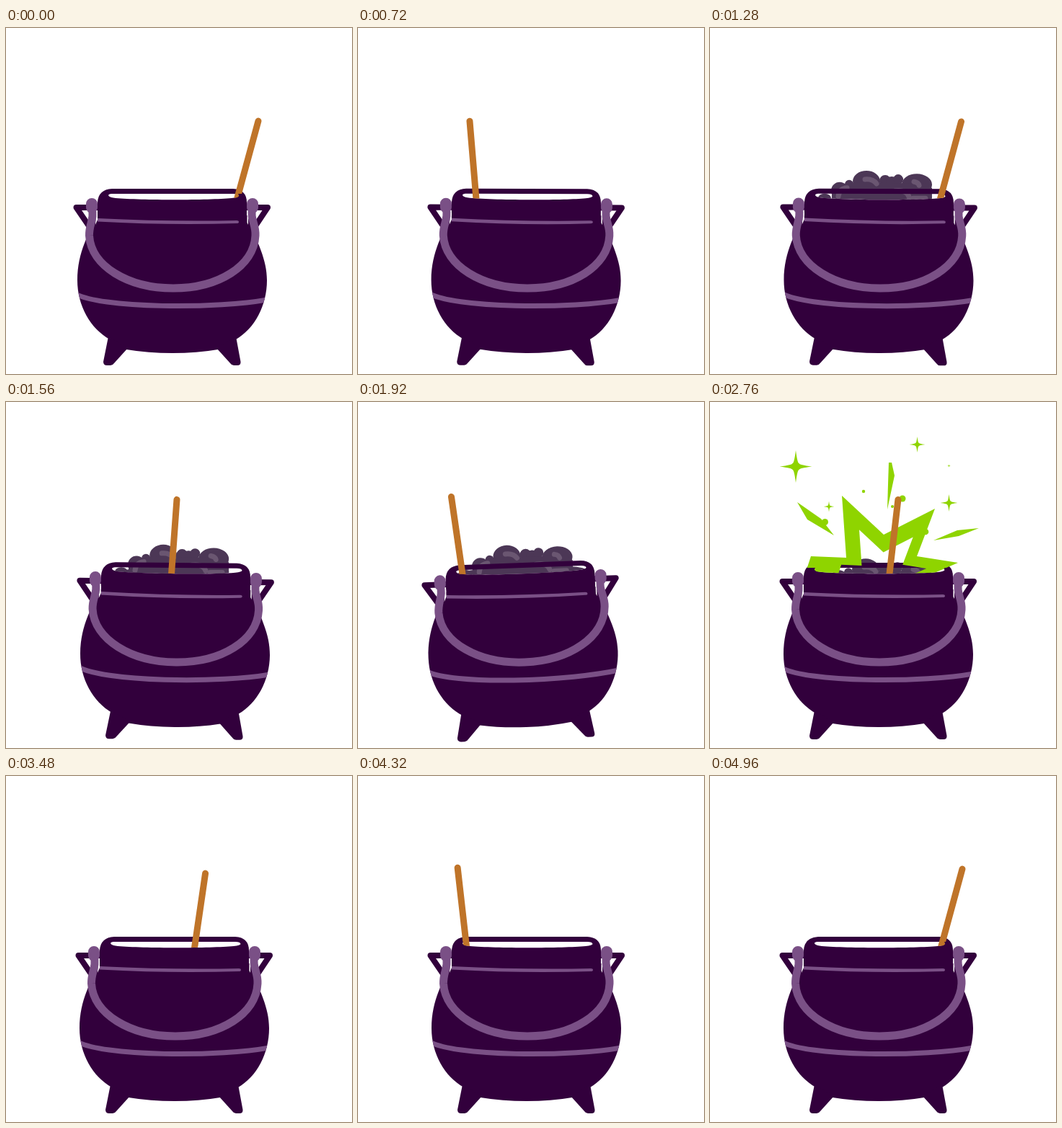
Recreate the animation shown at these times as an HTML page. Size 480 by 480 pixels, loop 5000 ms.

```html
<!DOCTYPE html>
<html lang="en">
<head>
<meta charset="utf-8">
<title>Cauldron</title>
<style>
  html, body { margin: 0; height: 100%; overflow: hidden; background: #fff; }
  svg { display: block; width: 100%; height: 100%; }
  .dark { fill: #32003c; }
  .line { fill: none; stroke: #7a5086; stroke-linecap: round; }
  .gloss { fill: none; stroke: #6a5671; stroke-width: 7; stroke-linecap: round; }
  .foam { fill: #4c3756; }
  .magic { fill: #8fd400; }
</style>
</head>
<body>
<svg viewBox="0 0 480 480">
  <defs>
    <clipPath id="mouth"><path d="M-60-60H540V230H325Q328 234 322 235.5C290 239 180 239 150 235.5Q143 234 146 230H-60Z"/></clipPath>
    <clipPath id="belly"><path id="bellyShape" d="M130 260C119 283 102 310 102 350C102 385 120 417 147 432Q158 442 170 446Q200 451 234 451T297 446Q311 441 322 432C348 417 365 385 365 350C365 320 352 300 338 260Z"/></clipPath>
  </defs>
  <g id="pot">
    <g clip-path="url(#mouth)">
      <ellipse id="liquid" class="foam" cx="235" cy="235" rx="88" ry="7"/>
      <g id="foam" class="foam">
        <ellipse cx="216" cy="213" rx="19" ry="15"/>
        <ellipse cx="286" cy="217" rx="21" ry="15"/>
        <circle cx="242" cy="212" r="8"/>
        <circle cx="251" cy="214" r="8"/>
        <circle cx="260" cy="210" r="7"/>
        <circle cx="179" cy="226" r="12"/>
        <circle cx="192" cy="217" r="6"/>
        <ellipse cx="158" cy="236" rx="9" ry="6"/>
        <path d="M168 226L190 215H300L307 222V260H168Z"/>
        <path class="gloss" d="M214 210Q225 209 230 216M282 213Q288 214 289 218M177 234Q178 223 189 222M256 226Q272 224 275 234M281 236H298"/>
      </g>
    </g>
    <g fill="none" stroke="#32003c" stroke-width="8" stroke-linejoin="round">
      <path d="M132 249H100.500L121 279"/>
      <path d="M335 249H366L346 279"/>
    </g>
    <use href="#bellyShape" class="dark"/>
    <path class="dark" d="M145 428L138 463Q138 468 143 468H148Q151 468 153 465L172 444ZM322 428L328.500 463Q329 468 324 468H319Q316 468 314 465L295 444Z"/>
    <path class="dark" fill-rule="evenodd" d="M150 223H318Q337 224 337 242V270H130V242Q131 224 150 223ZM149 230Q143 231 146 233.500Q148 235.300 155 236C190 239 285 239 316 236Q325 235 325.500 233Q325 230 318 230Z"/>
    <g clip-path="url(#mouth)">
      <path id="burst" class="magic" fill-rule="evenodd"/>
      <g id="sparks" class="magic"></g>
      <line id="stick" stroke="#bf7429" stroke-width="9" stroke-linecap="round"/>
    </g>
    <path fill="#7a5086" d="M130 264Q230 269 323 267Q326 267 326 269T323 271Q230 274 130 268.500Z"/>
    <path class="line" stroke-width="7" clip-path="url(#belly)" d="M96 367C130 390 300 390 370 376"/>
    <path fill="#fff" d="M128 256H130V266L127 273ZM337.500 258H339V273L337.500 270Z"/>
    <path class="line" stroke-width="11" d="M122 250C126 265 118 272 118.500 288C121 330 172 361 235 361S347 330 349 288C350 272 341 265 345 250"/>
    <path class="line" stroke-width="16" d="M122 244V249M345 244V249"/>
  </g>
</svg>
<script>
const LOOP = 5000, STEP = 40;
const get = id => document.getElementById(id);
const [pot, liquid, foam, burst, sparks, stick] =
  ["pot", "liquid", "foam", "burst", "sparks", "stick"].map(get);

// Smooth 0..1 between two moments
const ramp = (t, a, b) => {
  const x = Math.min(1, Math.max(0, (t - a) / (b - a)));
  return x * x * (3 - 2 * x);
};
const set = (el, attrs) => {
  for (const key in attrs) el.setAttribute(key, attrs[key]);
};

const center = [240, 242];
const spikes = [[120, 275], [140, 214], [189, 216], [183, 130], [241, 184],
  [312, 148], [287, 214], [344, 223], [300, 242], [330, 285]];
const outline = scale => "M" + spikes.map(p =>
  p.map((v, i) => center[i] + (v - center[i]) * scale)).join("L") + "Z";

const starPath = r => {
  const k = r * 0.2;
  return `M0 ${-r}Q${k / 2} ${-k} ${k} ${-k}Q${k} ${-k / 2} ${r} 0Q${k} ${k / 2} ${k} ${k}` +
    `Q${k / 2} ${k} 0 ${r}Q${-k / 2} ${k} ${-k} ${k}Q${-k} ${k / 2} ${-r} 0` +
    `Q${-k} ${-k / 2} ${-k} ${-k}Q${-k / 2} ${-k} 0 ${-r}Z`;
};
const dotPath = r => `M${-r} 0a${r} ${r} 0 1 0 ${2 * r} 0a${r} ${r} 0 1 0 ${-2 * r} 0Z`;

const addSpark = (x, y, d) => {
  const el = document.createElementNS("http://www.w3.org/2000/svg", "path");
  el.setAttribute("d", d);
  sparks.append(el);
  return { el, x, y };
};
const twinkles = [
  ...[[119, 89.5, 22.5], [287.5, 59, 11], [331.5, 140, 12], [165, 145, 7.5], [331.5, 88.5, 2.5]]
    .map(([x, y, r]) => addSpark(x, y, starPath(r))),
  ...[[267, 134, 4.5], [213, 124, 2.2], [159.500, 166.5, 4.5], [299, 180, 4.3], [253, 145, 2]]
    .map(([x, y, r]) => addSpark(x, y, dotPath(r)))
];
const shards = [
  addSpark(121, 139, "M0 0L33 23L51 46L14 24Z"),
  addSpark(250, 84, "M-2 0H2L6 18L-4 65L-3 30Z"),
  addSpark(373, 175, "M0 0L-28 11L-63 17L-30 3Z")
];

function draw(t) {
  const shift = -3 * (1 - ramp(t, 560, 800));
  const sway = ramp(t, 600, 1160) * (1 - ramp(t, 2080, 2340));
  const tilt = -2.15 * sway * Math.cos(2 * Math.PI * (t - 1920) / 505);
  set(pot, { transform: `rotate(${tilt} 233.5 468) translate(${shift})` });

  const stir = Math.cos(2 * Math.PI * (t + 20) / 1250);
  set(stick, {
    x1: 243.5 + 107 * stir - shift, y1: 135.5 - 7.5 * stir * stir + stir,
    x2: 235 + 85.5 * stir - shift, y2: 239
  });

  const sunk = 1 - ramp(t, 680, 1250) + ramp(t, 2480, 3100);
  set(foam, { transform: `translate(0 ${45 * sunk})` });
  const filled = ramp(t, 900, 1800) * (1 - ramp(t, 2350, 2800));
  set(liquid, { rx: 88 * filled, ry: 7 * filled });

  const outer = ramp(t, 2420, 2680);
  const hole = ramp(t, 2550, 2930);
  burst.setAttribute("d", outer > 0 && hole < 1 ? outline(outer) + outline(outer * hole) : "");

  const size = ramp(t, 2440, 2680) * (1 - ramp(t, 2800, 3200));
  for (const { el, x, y } of twinkles)
    set(el, { transform: `translate(${x} ${y}) scale(${size})` });

  const flight = ramp(t, 2460, 2700);
  const length = flight * (1 - ramp(t, 2760, 3080));
  for (const { el, x, y } of shards) {
    const px = center[0] + (x - center[0]) * flight;
    const py = center[1] + (y - center[1]) * flight;
    set(el, { transform: `translate(${px} ${py}) scale(${length})` });
  }
}

const start = performance.now();
function tick() {
  const t = (performance.now() - start) % LOOP;
  draw(Math.floor(t / STEP) * STEP);
  requestAnimationFrame(tick);
}
tick();
</script>
</body>
</html>
```
